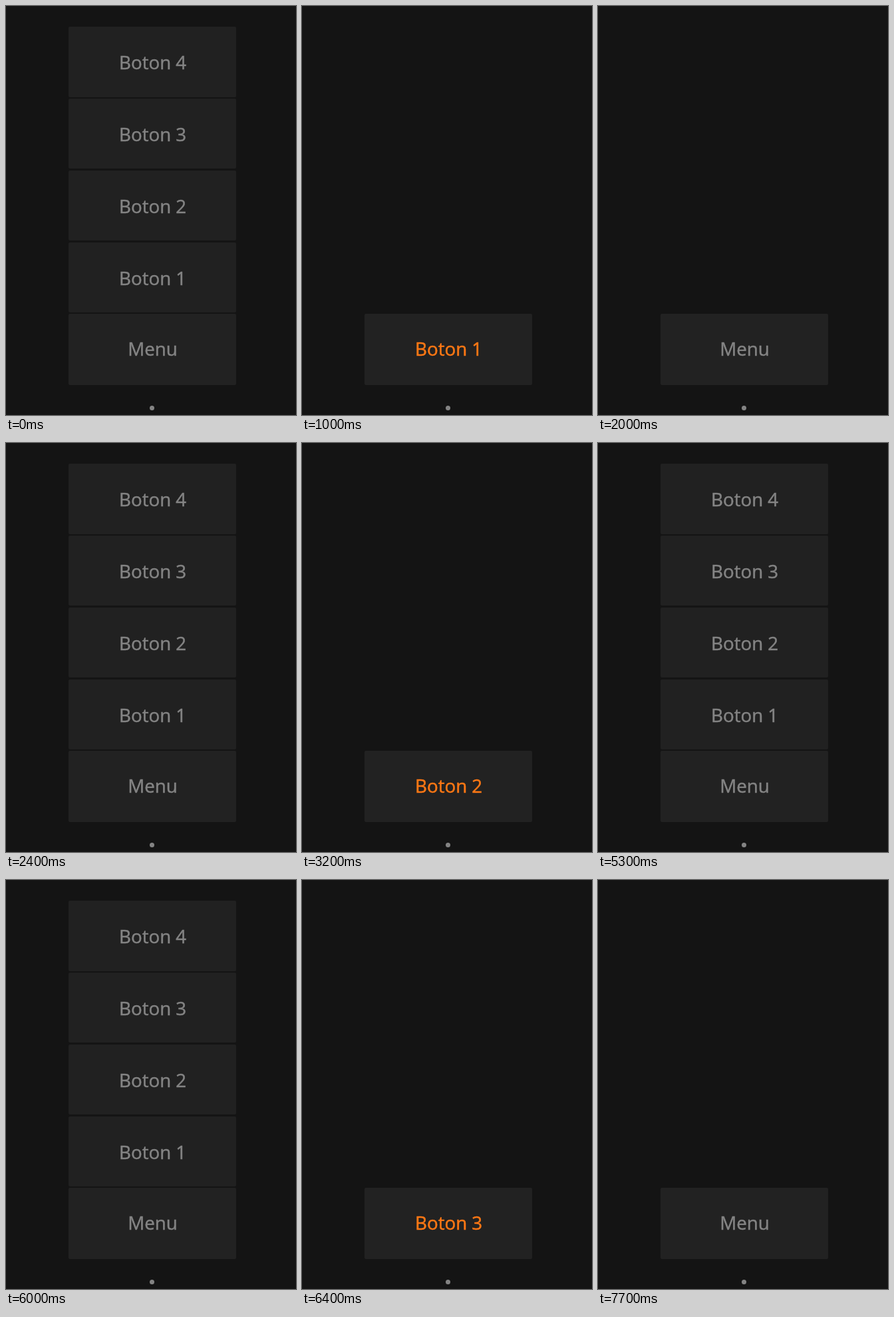
Write an HTML page that moves like this. It is 436 px wide and 614 px high and loops after 8000 ms.

```html
<!DOCTYPE html>
<html lang="es">
<head>
<meta charset="utf-8">
<title>Menu</title>
<style>
  html, body { margin: 0; width: 100%; height: 100%; overflow: hidden; background: #141414; }
  svg { display: block; width: 100vw; height: 100vh; }
  rect { fill: #222; }
  #list rect { fill: #212121; }
  text {
    font: 400 27.7px "Open Sans", "Noto Sans", sans-serif;
    text-anchor: middle;
    fill: currentColor;
    stroke: currentColor;
    stroke-width: 0.5px;
    color: #848484;
  }
  .picked { color: #ff7814; }
</style>
</head>
<body>
<svg viewBox="0 0 436 614">
  <g id="list"></g>
  <g id="main"></g>
  <circle cx="219.5" cy="603.5" r="3.5" fill="#848484"/>
</svg>
<script>
const LOOP = 8000;

// start time, list open, picked button (0 = none)
const STEPS = [
  [0, true, 0],
  [100, false, 1],
  [1400, false, 0],
  [2400, true, 0],
  [3200, false, 2],
  [4600, false, 0],
  [5300, true, 0],
  [6400, false, 3],
  [7700, false, 0]
];

// label, top, height, baseline
const ROWS = [
  ["Boton 4", 31, 106, 95],
  ["Boton 3", 139, 105, 203],
  ["Boton 2", 247, 105, 311],
  ["Boton 1", 355, 105, 419]
];

const list = document.getElementById("list");
const main = document.getElementById("main");

function add(parent, tag, attrs) {
  const el = document.createElementNS("http://www.w3.org/2000/svg", tag);
  for (const key in attrs) el.setAttribute(key, attrs[key]);
  return parent.appendChild(el);
}

function addButton(parent, [label, y, height, baseline]) {
  add(parent, "rect", { x: 94, y, width: 252, height, rx: 2 });
  const text = add(parent, "text", { x: 220.6, y: baseline });
  text.textContent = label;
  return text;
}

ROWS.forEach(row => addButton(list, row));
const mainText = addButton(main, ["Menu", 462, 107, 525]);

let shown = null;

function draw(time) {
  const step = STEPS.filter(s => s[0] <= time).pop();
  if (step === shown) return;
  shown = step;
  const [, open, picked] = step;
  list.setAttribute("visibility", open ? "visible" : "hidden");
  mainText.textContent = picked ? "Boton " + picked : "Menu";
  mainText.setAttribute("class", picked ? "picked" : "");
}

const start = performance.now();

function tick() {
  draw((performance.now() - start) % LOOP);
  requestAnimationFrame(tick);
}

tick();
</script>
</body>
</html>
```
